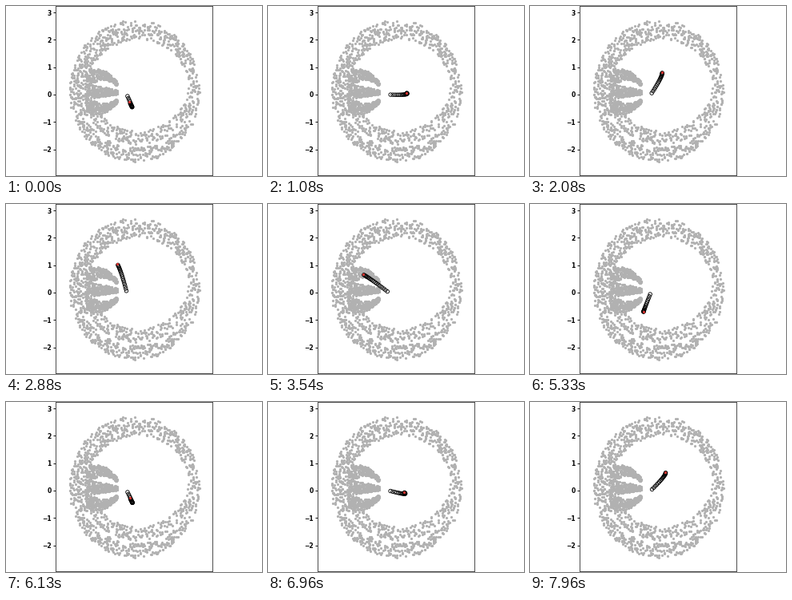
Write a matplotlib script that moves like this. It is 320 px wide and 213 px high and loops after 8 s.

```python
import numpy as np
import matplotlib.pyplot as plt
from matplotlib.animation import FuncAnimation

W, H = 320, 213
PX = 0.72                      # points per pixel at 100 dpi
LOOP, STEP = 8000, 40          # ms
TURN = 6090                    # ms for one sweep of the arm
BASE = np.array([151.0, 111.0])
ORBIT = np.array([144.0, 106.0])
STEM = 28.0                    # length of the arm's control handle
LINKS = 18

rng = np.random.default_rng(7)


def polar(r, deg):
    a = np.radians(deg)
    return r * np.array([np.cos(a), -np.sin(a)])


def bezier(p, c, q, u):
    u = np.asarray(u)[:, None]
    return (1 - u) ** 2 * np.array(p) + 2 * u * (1 - u) * np.array(c) + u ** 2 * np.array(q)


def ellipse(pts, centre, radii):
    """Scaled distance from an ellipse's centre; 1 on its rim."""
    return np.hypot(*((pts - centre) / radii).T)


def band(n):
    """Even scatter between two ellipses, with a thin seam at the bottom."""
    pts = rng.uniform((79, 18), (242, 196), (n, 2))
    keep = ellipse(pts, (160.5, 106.5), (81.5, 89)) < 1
    keep &= ellipse(pts, (165, 99), (62, 57)) > 1
    seam = abs(ellipse(pts, (163, 103), (71, 72)) - 1) < 0.025
    return pts[keep & ~(seam & (pts[:, 1] > 140))]


def finger(n, k):
    """Scatter in a tapering curved strip; k is its side, -1 to 1."""
    u = rng.uniform(0, 1, n)
    pts = bezier((99, 107 + 15 * k), (122, 107 + 29 * k), (139, 108 + 10 * k), u)
    pts[:, 1] += rng.uniform(-1, 1, n) * (10 - 7.5 * u)
    return pts


def arm(t):
    sweep = 360 * t / TURN
    heading = sweep - 66
    lag = 5 + 14 * np.cos(np.radians(sweep - 123))
    radius = 31 - 14 * np.cos(np.radians(sweep - 9) / 2) ** 16
    tip = ORBIT + polar(radius, sweep + 303 - lag)
    return bezier(BASE, BASE + polar(STEM, heading), tip, np.linspace(0.04, 1, LINKS))


cloud = np.vstack([band(2900)] + [finger(240, k) for k in (-1, 0, 1)])

fig = plt.figure(figsize=(W / 100, H / 100), dpi=100, facecolor="white")
left, right, top, bottom = 62, 258, 0, 212.4
ax = fig.add_axes([left / W, 1 - bottom / H, (right - left) / W, (bottom - top) / H])
ax.set_xlim(left, right)
ax.set_ylim(bottom, top)
ax.set_xticks([])
levels = range(-2, 4)
ax.set_yticks([111 - 34.3 * k for k in levels])
ax.set_yticklabels([str(k).replace("-", "\u2212") for k in levels],
                   fontname="DejaVu Sans", fontweight="bold", fontsize=7.6 * PX)
ax.tick_params(axis="y", length=2.6 * PX, width=0.9 * PX, pad=2.8 * PX)
for spine in ax.spines.values():
    spine.set_linewidth(0.9 * PX)
    spine.set_edgecolor("#3c3c3c")

ax.scatter(*cloud.T, s=(3.2 * PX) ** 2, c="#b1b1b1", linewidths=0)
start = arm(0)
rings = ax.scatter(*start.T, s=(4.5 * PX) ** 2, facecolors="none",
                   edgecolors="black", linewidths=0.85 * PX, zorder=3)
dot = ax.scatter(*start[-1:].T, s=(3.2 * PX) ** 2, c="#d8322e",
                 linewidths=0, zorder=4)


def draw(i):
    pts = arm(i * STEP)
    rings.set_offsets(pts[:-1])
    dot.set_offsets(pts[-1:])
    return rings, dot


anim = FuncAnimation(fig, draw, frames=LOOP // STEP, interval=STEP,
                     repeat=True, repeat_delay=0, blit=False)
plt.show()
```
